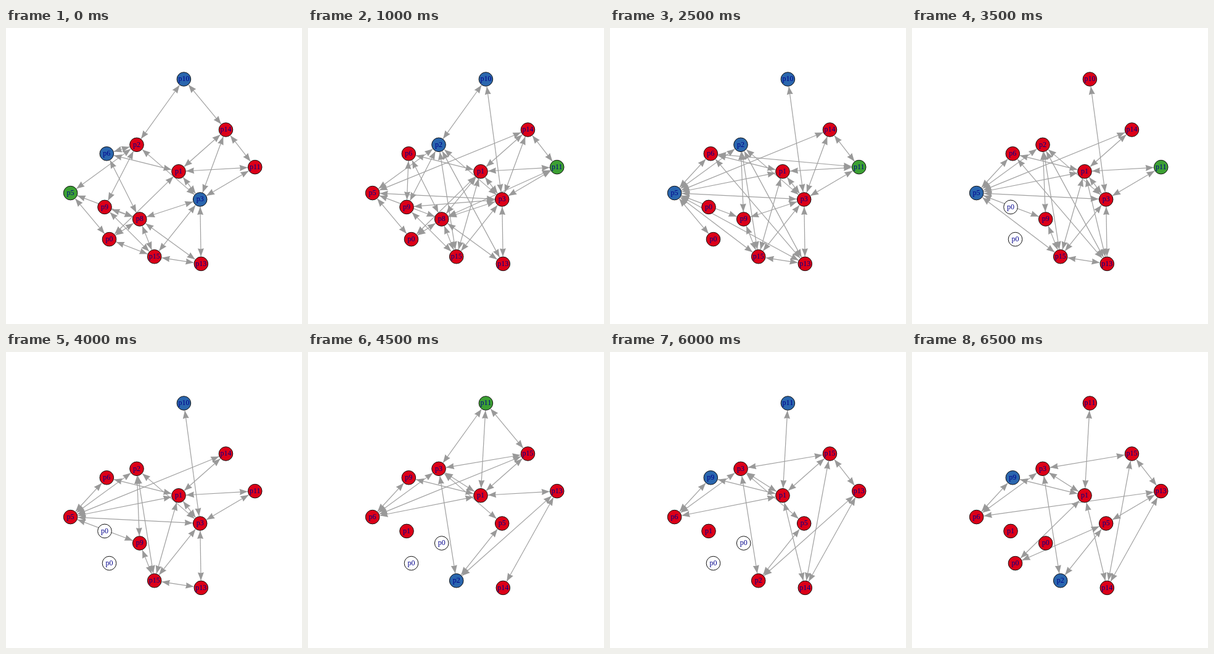
An HTML page for the animation above (7000 ms loop, 480x480 px).

```html
<!DOCTYPE html>
<html lang="en">
<head>
<meta charset="utf-8">
<title>Peer network</title>
<style>
  html, body { margin: 0; width: 100%; height: 100%; overflow: hidden; background: #fff; }
  svg { display: block; width: 100vw; height: 100vh; }
  .edge { stroke: #a0a0a0; stroke-width: 1.2; }
  .head { fill: #999; }
  circle { stroke: #111; stroke-width: 1; }
  text { font: 12px "Liberation Serif", serif; fill: #00008b; text-anchor: middle; }
</style>
</head>
<body>
<svg id="stage" viewBox="0 0 480 480"></svg>
<script>
const STEP = 500;
const RADIUS = 11.3;
const COLORS = { red: '#dc0018', blue: '#2a66ae', green: '#3ca033', white: '#fff' };

const places = {
  A: [288.4, 83], B: [356.5, 165], C: [212, 189.3], D: [163.3, 203.8], E: [280, 232.7],
  F: [403.8, 225.6], G: [104.6, 267.6], H: [160, 290.4], I: [314.7, 278], J: [216.7, 310],
  K: [167.5, 342.6], L: [240.7, 370.8], M: [316.3, 382.4]
};

// Peer numbers for places A to M
const early = [10, 14, 2, 6, 1, 11, 5, 9, 3, 8, 0, 15, 13];
const middle = [10, 14, 2, 6, 1, 11, 5, 0, 3, 9, 0, 15, 13];
const late = [11, 15, 3, 9, 1, 13, 6, 1, 5, 0, 0, 2, 14];

const state = (labels, blue, green, white, edges) =>
  ({ labels, blue, green, white, edges: edges.split(' ') });

const states = [
  state(early, 'ADI', 'G', '', 'AC AB BE BI BF CD CG CH CI DE DJ EF EI EK FI GK GJ HJ HL IJ IL IM JK JL JM KL LM'),
  state(early, 'AC', 'F', '', 'AC AB BE BI BF CG CH CI CL DE DH DJ EF EI EK EL FI GK GJ GI HL IJ IL IM JK JL JM'),
  state(early, 'AC', 'F', '', 'AC AI BG BE BI BF CG CH CI CL CM DE DH DJ EF EI EJ EK EL FI FJ GK GJ GI HI HL IJ IL IM JK JL JM'),
  state(early, 'AC', 'F', '', 'AC AI BG BE BI BF CG CH CI CL CM DE DJ EF EG EI EK EL FI GK GJ GI HL IJ IL IM JK JL JM LM'),
  state(middle, 'C', 'F', '', 'AI BG BI BF CG CJ CL CM CI DE DG DM EF EG EI EL FI GI GJ GK GL IJ IL IM JL LM'),
  state(middle, 'ACG', 'F', '', 'AI BG BI BF CG CJ CL CM CI DE DG DF DM EF EG EI EL FI GI GJ GK GL GM IJ IL IM JL LM'),
  state(middle, '', 'F', 'HK', 'AI BG BI BF CG CJ CL CM CI DE DG DM EF EG EI EL FI GI GJ GL IL IM JL LM'),
  state(middle, 'G', 'F', 'HK', 'AI BG BE CG CJ CL CM CI DE DG DM EF EG EI EL EM FI GI GJ GL IL IM JL LM'),
  state(middle, 'A', '', 'HK', 'AI BG BE CG CJ CL CI DE DG EF EG EI EL FI GI GJ IL IM JL LM'),
  state(late, 'L', 'A', 'JK', 'AC AB AE BC BE BG CE CG CI CL DE DG EF EG FL FM IL'),
  state(late, 'AL', '', 'JK', 'AC AE BC BE BG CE CG CI CL DE DG EF EG EM FL FM GI IL'),
  state(late, 'DI', '', 'JK', 'AC AE BC BE BF BG BM CE CG CI CL CM DE DG EG EM FL FM GI GM IL'),
  state(late, 'AD', '', 'JK', 'AE BC BE BF BM CE CG CI CL DE DG EG EM FL FM IL'),
  state(late, 'DL', '', '', 'AE BC BF BM CE CG CL DE DG EK EM FG FI FM IK IL')
];

function arrowHead([x, y], angle) {
  const degrees = angle * 180 / Math.PI;
  return `<path class="head" transform="translate(${x} ${y}) rotate(${degrees})" d="M0 0L-13 5L-12 0L-13 -5Z"/>`;
}

function edge([from, to]) {
  const [x1, y1] = places[from], [x2, y2] = places[to];
  const angle = Math.atan2(y2 - y1, x2 - x1);
  const dx = Math.cos(angle) * 12, dy = Math.sin(angle) * 12;
  const start = [x1 + dx, y1 + dy], end = [x2 - dx, y2 - dy];
  return `<line class="edge" x1="${start[0]}" y1="${start[1]}" x2="${end[0]}" y2="${end[1]}"/>`
    + arrowHead(start, angle + Math.PI) + arrowHead(end, angle);
}

function node(key, index, current) {
  const [x, y] = places[key];
  const color = ['blue', 'green', 'white'].find(name => current[name].includes(key)) || 'red';
  return `<circle cx="${x}" cy="${y}" r="${RADIUS}" fill="${COLORS[color]}"/>`
    + `<text x="${x}" y="${y + 3.4}">p${current.labels[index]}</text>`;
}

const stage = document.getElementById('stage');
let shown = -1;

function draw(time) {
  const index = Math.floor(Math.max(0, time) / STEP) % states.length;
  if (index !== shown) {
    shown = index;
    const current = states[index];
    stage.innerHTML = current.edges.map(edge).join('')
      + Object.keys(places).map((key, i) => node(key, i, current)).join('');
  }
}

const began = performance.now();
function tick() {
  draw(performance.now() - began);
  requestAnimationFrame(tick);
}
tick();
</script>
</body>
</html>
```
